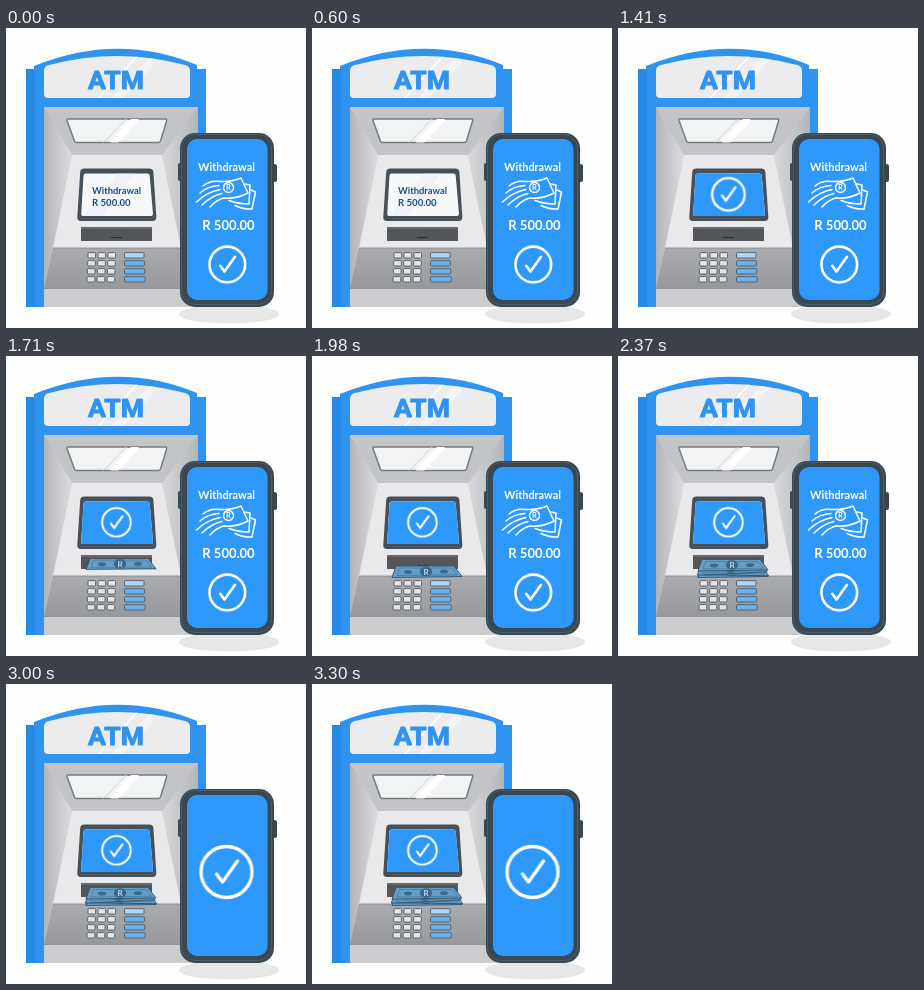
Animation of 300x300 px, one loop 4530 ms. Source, as an HTML page:

```html
<!DOCTYPE html>
<html lang="en">
<head>
<meta charset="utf-8">
<title>Cash withdrawal</title>
<style>
  html, body { margin: 0; width: 100%; height: 100%; overflow: hidden; background: #fefefe; }
  svg { display: block; width: 100vw; height: 100vh; }
  text { font-family: Lato, "Open Sans", sans-serif; font-weight: 700; }
  .mid { text-anchor: middle; }
  .line { fill: none; stroke: #fff; stroke-linecap: round; stroke-linejoin: round; }

  .wipe, .tick, .note, .old, .move { animation: 4530ms linear infinite; }
  .wipe { animation-name: wipe; }
  .tick { animation-name: pop; transform-origin: 110.4px 166.3px; }
  .first { animation-name: first; }
  .stack { animation-name: stack; }
  .old { animation-name: leave; }
  .move { animation-name: rise; }

  @keyframes wipe {
    0%, 22.3% { transform: translateX(75px); }
    24.5% { transform: translateX(11px); }
    24.94%, 100% { transform: none; }
  }
  @keyframes pop {
    0%, 25.1% { transform: scale(0); opacity: 0; animation-timing-function: ease-out; }
    29.8%, 31.2% { transform: scale(1.14); opacity: 1; animation-timing-function: ease-in-out; }
    33.77%, 100% { transform: none; opacity: 1; }
  }
  @keyframes first {
    0%, 34.3% { transform: translateY(-18px); animation-timing-function: ease-out; }
    43%, 100% { transform: none; }
  }
  @keyframes stack {
    0%, 46.3% { transform: translateY(-19px); animation-timing-function: ease-out; }
    52%, 100% { transform: none; }
  }
  @keyframes leave {
    0%, 59.4% { opacity: 1; }
    60.93% { opacity: .52; }
    63%, 100% { opacity: 0; }
  }
  @keyframes rise {
    0%, 59.4% { transform: translate(221px, 236px) scale(.82); opacity: 0; }
    60.93% { transform: translate(221px, 214px) scale(.92); opacity: .5; animation-timing-function: ease-out; }
    66%, 100% { transform: translate(220.5px, 188px); opacity: 1; }
  }
</style>
</head>
<body>
<svg viewBox="0 0 300 300" xmlns="http://www.w3.org/2000/svg">
  <defs>
    <linearGradient id="wallL"><stop offset="0" stop-color="#b3b4b7"/><stop offset="1" stop-color="#dcdddf"/></linearGradient>
    <linearGradient id="wallR"><stop offset="0" stop-color="#d8d9db"/><stop offset="1" stop-color="#b3b4b7"/></linearGradient>
    <linearGradient id="shelf" x2="0" y2="1"><stop offset="0" stop-color="#a9abae"/><stop offset="1" stop-color="#97999d"/></linearGradient>
    <clipPath id="sign"><path id="signShape" d="M38 43Q38 38 43 37Q111 19 179 37Q184 38 184 43V66Q184 70 180 70H42Q38 70 38 66Z"/></clipPath>
    <clipPath id="pane"><path id="paneShape" d="M62 91H160Q161 91 160.7 92.5L154.5 113Q154 114.500 152 114.500H71Q69 114.500 68.400 113L61 92.500Q60.500 91 62 91Z"/></clipPath>
    <clipPath id="screen"><path id="screenShape" d="M79.500 145.500H141.500Q143.500 145.500 143.700 147.500L147 186Q147 188 145 188H77Q75 188 75.200 186L77.500 147.500Q77.700 145.500 79.500 145.500Z"/></clipPath>
    <clipPath id="outlet"><rect x="70" y="203.500" width="90" height="30"/></clipPath>
    <g id="check" class="line">
      <circle r="25.500"/>
      <path d="M-10 2L-4 10L11 -11"/>
    </g>
    <g id="bill">
      <path d="M84 204H142L150 214.500L80 215.500Z" fill="#649fca" stroke="#31536f" stroke-width=".9" stroke-linejoin="round"/>
      <path d="M87.500 206H140L145.500 212.800L85 213.500Z" fill="none" stroke="#3f6c8d" stroke-width=".6"/>
      <ellipse cx="96" cy="210" rx="4" ry="2" fill="#3d6b8d"/>
      <ellipse cx="132" cy="209.600" rx="4" ry="2" fill="#3d6b8d"/>
      <ellipse cx="114" cy="209.600" rx="6.200" ry="4.800" fill="#3c6788"/>
      <text class="mid" x="114" y="212.500" font-size="8" fill="#b4dcf6">R</text>
    </g>
  </defs>

  <!-- cabinet -->
  <path d="M20 41H28V38Q112 4 191 37V41H200V279H20Z" fill="#2f94f0"/>
  <path d="M20 41H29V279H20Z" fill="#278ae6"/>
  <use href="#signShape" fill="#ececee"/>
  <g clip-path="url(#sign)" stroke="#fff">
    <path d="M137 22L87 76" stroke-width="1.500"/>
    <path d="M156 22L106 76" stroke-width="8" opacity=".45"/>
  </g>
  <text class="mid" x="110" y="60.500" font-family="Roboto, sans-serif" font-size="26.500" fill="#2f94f0" stroke="#2f94f0" stroke-width="1" stroke-linejoin="round" style="font-family:Roboto,sans-serif">ATM</text>

  <!-- recess -->
  <path d="M38 79H192V279H38Z" fill="#c3c4c7"/>
  <path d="M38 79L66 127L47 220L38 260Z" fill="url(#wallL)"/>
  <path d="M192 79L156 127L175 220L192 260Z" fill="url(#wallR)"/>
  <path d="M66 127H156L175 220H47Z" fill="#e9e9eb"/>
  <path d="M47 220H178L188 260H38Z" fill="url(#shelf)"/>
  <path d="M38 260H192V279H38Z" fill="#cbccce"/>
  <path d="M38 260.500H192M47 220H175" stroke="#85878b" stroke-width=".8"/>
  <use href="#paneShape" fill="#f2f3f3" stroke="#777b80" stroke-width="1.500"/>
  <g clip-path="url(#pane)" stroke="#cfd1d3">
    <path d="M121 90L96 116" stroke-width="1"/>
    <path d="M131 90L106 116" stroke="#fff" stroke-width="7"/>
  </g>

  <!-- display -->
  <path d="M78 140.500H143Q147 140.500 147.400 144L150.300 189Q150.500 193 146.500 193H75Q71 193 71.300 189L74.200 144Q74.500 140.500 78 140.500Z" fill="#465059"/>
  <use href="#screenShape" fill="#f6f8fa"/>
  <g clip-path="url(#screen)">
    <path d="M113 144H130L94 190H76Z" fill="#e9edf0" opacity=".55"/>
    <g fill="#17508c">
      <text x="86" y="166" font-size="9.400">Withdrawal</text>
      <text x="86" y="178" font-size="9.600">R 500.00</text>
    </g>
    <rect class="wipe" x="75" y="144" width="74" height="46" fill="#2f99fb"/>
    <g class="tick">
      <use href="#check" transform="translate(110.400 166.300) scale(.56)" stroke-width="3.600"/>
    </g>
  </g>

  <!-- cash slot -->
  <path d="M75 199H146V213H75Z" fill="#53565b"/>
  <path d="M75 199H146V201H75Z" fill="#66696e"/>
  <path d="M105 209.500H116" stroke="#2d3034" stroke-width="1.200"/>
  <g clip-path="url(#outlet)">
    <g class="note first"><use href="#bill" y="6"/></g>
    <g class="note stack">
      <use href="#bill" transform="rotate(2 114 210) translate(1 4)"/>
      <use href="#bill" transform="rotate(-2 114 210) translate(-1 2.500)"/>
      <use href="#bill" transform="translate(0 -.5)"/>
    </g>
  </g>

  <g id="keys" stroke="#565b61" stroke-width=".9"></g>

  <!-- phone -->
  <ellipse cx="223" cy="286" rx="50" ry="9.500" fill="#e7e7e8"/>
  <rect x="172" y="135" width="6" height="18" rx="2" fill="#394750"/>
  <rect x="264" y="136" width="7" height="18" rx="2.500" fill="#394750"/>
  <rect x="174" y="105" width="94" height="174" rx="15" fill="#394750"/>
  <rect x="175.500" y="106.500" width="90" height="170" rx="13.500" fill="none" stroke="#4d5c66" stroke-width="1"/>
  <rect x="181" y="111" width="80.500" height="161" rx="10" fill="#2f99fb"/>
  <g class="old" fill="#fff">
    <text class="mid" x="220.500" y="143" font-size="10.900">Withdrawal</text>
    <g class="line" stroke-width="1.500">
      <path d="M214 153.500Q226 154 235 150L242 165Q231 171 218 170"/>
      <path d="M238.500 156L244 157L243 176Q232 176 223 172.500"/>
      <path d="M245 162L249.500 164L246 181Q237 181.500 229 177.500"/>
      <path d="M214 153.500Q204 152 197 158M213 157.500Q202 158 194 165M214 161.500Q201 164 190.500 174M216 165.500Q205 168 196 177M218 170Q210 172 204 179"/>
      <circle cx="222.500" cy="159.500" r="5"/>
    </g>
    <text class="mid" x="222.500" y="162.300" font-size="7.500">R</text>
    <text class="mid" x="222.500" y="202" font-size="13">R 500.00</text>
    <use href="#check" transform="translate(221.300 236.500) scale(.7)" stroke-width="3.700"/>
  </g>
  <g class="move"><use href="#check" stroke-width="3.300"/></g>
</svg>
<script>
  const keys = document.getElementById("keys");

  function key(x, y, width, fill) {
    const rect = document.createElementNS("http://www.w3.org/2000/svg", "rect");
    const attrs = { x, y, width, height: 5.4, rx: 1, fill };
    for (const name in attrs) rect.setAttribute(name, attrs[name]);
    keys.append(rect);
  }

  for (let row = 0; row < 4; row++) {
    const y = 224.600 + row * 8;
    for (let col = 0; col < 3; col++) key(82 - row * 0.3 + col * 10, y, 7.6, "#e3e5e8");
    key(118.500, y, 19.500 + row * 0.4, row ? "#62b2f8" : "#a9d5fb");
  }
</script>
</body>
</html>
```
